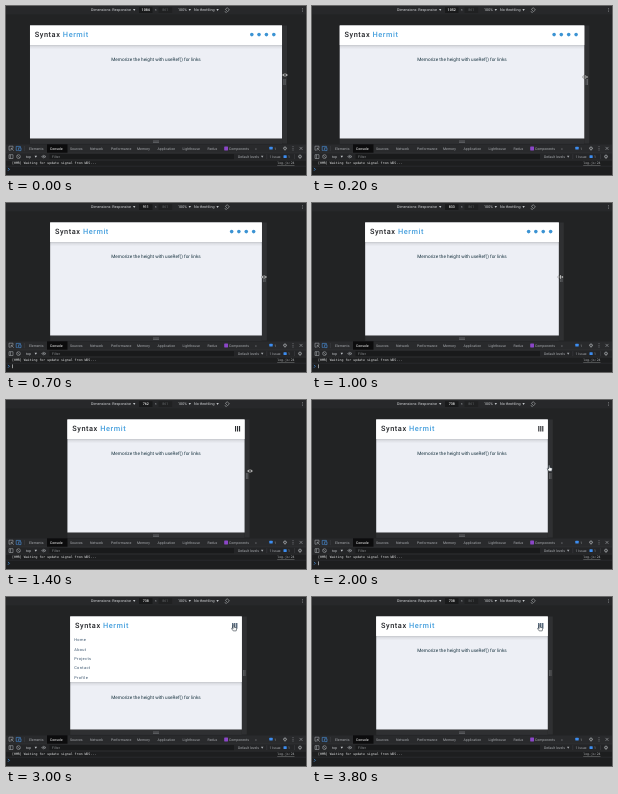
An HTML page that plays this animation: 300x169 px, repeating every 4.3 s.

```html
<!DOCTYPE html>
<html lang="en">
<head>
<meta charset="utf-8">
<title>Responsive menu</title>
<style>
  html, body { margin: 0; width: 100%; height: 100%; overflow: hidden; background: #222324; }
  svg { display: block; width: 100vw; height: 100vh; }
  text { font-family: Roboto, sans-serif; text-rendering: geometricPrecision; white-space: pre; }
  .mono { font-family: "DejaVu Sans Mono", monospace; }
</style>
</head>
<body>
<svg id="stage" viewBox="0 0 300 169" preserveAspectRatio="none">
  <defs>
    <linearGradient id="shade" x1="0" y1="0" x2="0" y2="1">
      <stop offset="0" stop-color="#000" stop-opacity=".17"/>
      <stop offset=".4" stop-color="#000" stop-opacity=".06"/>
      <stop offset="1" stop-color="#000" stop-opacity="0"/>
    </linearGradient>
    <clipPath id="menuClip"><rect id="menuBox" x="0" y="39" width="300" height="0"/></clipPath>
  </defs>
</svg>
<script>
const LOOP = 4300, STEP = 100, SCALE = 0.2325, MID = 150;
const NAV_BOTTOM = 39, MENU_HEIGHT = 46, PAGE_TOP = 19.5, PAGE_BOTTOM = 132.5;

// [ms, viewport width]
const WIDTHS = [[0, 1084], [200, 1052], [500, 966], [800, 883], [1000, 833],
  [1200, 804], [1400, 762], [1600, 762], [1800, 738]];
// [ms, x, y]
const POINTER = [[0, 279, 69], [500, 264.5, 74], [1000, 248.5, 74], [1400, 244, 71],
  [1600, 244, 71], [1800, 238.5, 72], [1950, 238.5, 72], [2500, 228, 31]];

const stage = document.getElementById('stage');
const menuBox = document.getElementById('menuBox');

function set(node, attrs) {
  for (const k in attrs) node.setAttribute(k, attrs[k]);
  return node;
}
function add(tag, attrs, parent = stage) {
  return parent.appendChild(set(document.createElementNS('http://www.w3.org/2000/svg', tag), attrs));
}
const rect = (x, y, width, height, fill, parent, more) =>
  add('rect', { x, y, width, height, fill, ...more }, parent);
const path = (d, stroke, parent, more) =>
  add('path', { d, stroke, fill: 'none', 'stroke-width': 0.55, ...more }, parent);
const disc = (cx, cy, r, fill, parent) => add('circle', { cx, cy, r, fill }, parent);
function label(str, x, y, size, fill, parent, more) {
  const node = add('text', { x, y, 'font-size': size, fill, ...more }, parent);
  node.textContent = str;
  return node;
}
const arrow = (x, y, fill = '#c4c7ca') =>
  path(`M${x} ${y}h2.4l-1.2 2z`, 'none', stage, { fill });
const dots = (x, y) => [-1.6, 0, 1.6].forEach(d => disc(x, y + d, 0.45, '#b4b7ba'));
function gear(x, y) {
  add('circle', { cx: x, cy: y, r: 1.5, fill: 'none', stroke: '#a9acaf', 'stroke-width': 0.9, 'stroke-dasharray': '.8 .38' });
  add('circle', { cx: x, cy: y, r: 1.1, fill: 'none', stroke: '#a9acaf', 'stroke-width': 0.5 });
}

function buildToolbar() {
  rect(0, 0, 300, 8.4, '#27282a');
  label('Dimensions: Responsive', 85, 5.3, 3.7, '#d5d7da');
  arrow(127, 3);
  rect(133, 1.2, 13.5, 5.8, '#191a1b');
  const width = label('', 139.7, 5.3, 3.6, '#f2f2f2', stage, { 'text-anchor': 'middle', 'font-weight': 500 });
  label('×', 148.7, 5.3, 3.6, '#a5a8ab');
  rect(152.6, 1.2, 13.5, 5.8, '#202122');
  label('861', 159.3, 5.3, 3.6, '#65686b', stage, { 'text-anchor': 'middle' });
  label('100%', 172, 5.3, 3.7, '#d5d7da');
  arrow(182.6, 3);
  label('No throttling', 188, 5.3, 3.7, '#d5d7da');
  arrow(210.4, 3);
  path('M219.4 3.2l2-1.5 2 2.3-2 1.6zM219 5.2q.2 1.4 1.7 1.4', '#b4b7ba');
  dots(296.5, 4);
  return width;
}

function buildDevtools() {
  const y = 143.8, soft = '#a9acb0';
  rect(0, 138.3, 300, 30.7, '#1d1e1f');
  rect(0, 138.3, 300, 8.7, '#292a2c');
  path('M3 140.2h4v1.7M3 140.2v4h1.6M5.2 142.3l2.6 2.4M5.2 142.3v2M5.2 142.3h2', soft);
  path('M10.2 140.4h4.2v1M10.2 140.4v4h1.6M12.6 141.8h2.4v2.8h-2.4z', '#4d9cf0');
  path('M18.4 140v5.2', '#494b4e', stage, { 'stroke-width': 0.4 });
  rect(41, 138.3, 20.5, 8.7, '#0c0c0d');
  [['Elements', 23], ['Console', 44], ['Sources', 64], ['Network', 84], ['Performance', 105],
    ['Memory', 131], ['Application', 151.5], ['Lighthouse', 176.5], ['Redux', 201.5], ['Components', 223]]
    .forEach(([name, x]) => label(name, x, y, 3.5, name === 'Console' ? '#fff' : soft));
  rect(218.2, 140.6, 3.8, 3.8, '#8b46c8', stage, { rx: 0.4 });
  label('»', 249, y, 3.6, soft);
  rect(263.3, 140.8, 3.4, 2.8, '#3d8df0', stage, { rx: 0.5 });
  label('1', 268.2, y, 3.3, soft);
  gear(279, 142.4);
  dots(287, 142.4);
  path('M293.5 140.9l3 3m0-3l-3 3', soft);

  const y2 = 151.9;
  rect(0, 147, 300, 7.2, '#242527');
  path('M0 147h300M0 154.2h300M0 160.2h300', '#3a3c3f', stage, { 'stroke-width': 0.4 });
  path('M3 148.7h4v3.8h-4zM4.4 148.7v3.8', soft);
  path('M11.1 149.3l2.7 2.7M10.6 150.6a1.9 1.9 0 1 0 3.8 0a1.9 1.9 0 1 0-3.8 0', soft);
  label('top', 20, y2, 3.5, '#c4c7ca');
  arrow(28.6, 149.8);
  path('M35.6 150.6q2.2-2.7 4.4 0q-2.2 2.7-4.4 0z', soft);
  disc(37.8, 150.6, 0.6, soft);
  rect(43.5, 148, 184.5, 5.2, '#191a1b');
  label('Filter', 46, y2, 3.5, '#85888b');
  label('Default levels', 232, y2, 3.5, soft);
  arrow(255, 149.8, soft);
  path('M260.8 148.2v4.8M288.5 148.2v4.8', '#494b4e', stage, { 'stroke-width': 0.4 });
  label('1 Issue:', 263.5, y2, 3.4, soft);
  rect(277.5, 149.2, 3.2, 2.7, '#3d8df0', stage, { rx: 0.5 });
  label('1', 282, y2, 3.4, soft);
  gear(294, 150.6);

  label('[HMR] Waiting for update signal from WDS...', 6, 158.3, 3.25, '#e4e5e6', stage, { class: 'mono' });
  label('log.js:24', 288.5, 158.3, 3.2, '#b0b2b4', stage,
    { class: 'mono', 'text-anchor': 'end', 'text-decoration': 'underline' });
  path('M2 161.9l1.4 1.4-1.4 1.4', '#4d9cf0', stage, { 'stroke-width': 0.7 });
  return rect(6.1, 161.4, 0.6, 3.8, '#e4e5e6');
}

function buildPage() {
  const strip = rect(0, PAGE_TOP, 5, 118.3 - 0.3, '#2f3032');
  const base = rect(0, PAGE_BOTTOM, 0, 5.4, '#2f3032');
  path('M147 135h6M147 136.4h6', '#8c8f92', stage, { 'stroke-width': 0.5 });
  const grip = add('g', {});
  path('M-.7 -3v6M.7 -3v6', '#8c8f92', grip, { 'stroke-width': 0.5 });

  const body = rect(0, PAGE_TOP, 0, PAGE_BOTTOM - PAGE_TOP, '#edeff5');
  const message = label('Memorize the height with useRef() for links', MID, 0, 4.7, '#17323f', stage, { 'text-anchor': 'middle' });
  const shade = rect(0, 0, 0, 4.5, 'url(#shade)');
  const nav = rect(0, PAGE_TOP, 0, 0, '#fff');

  const left = add('g', {});
  const title = label('', 4.8, 31, 7.4, '#222428', left, { 'font-weight': 500, 'letter-spacing': 0.55 });
  [['Syntax ', '#222428'], ['Hermit', '#459fdd']].forEach(([word, fill]) =>
    add('tspan', { fill }, title).textContent = word);
  const menu = add('g', { 'clip-path': 'url(#menuClip)' }, left);
  ['Home', 'About', 'Projects', 'Contact', 'Profile'].forEach((name, i) =>
    label(name, 4, 44.4 + i * 9.35, 3.9, '#324d67', menu, { 'letter-spacing': 0.38 }));

  const right = add('g', {});
  const social = add('g', {}, right);
  [-30.2, -23, -15.6, -8.2].forEach(x => disc(x, 28.6, 1.8, '#3b93d3', social));
  const bars = path('M-9 26v5.4M-7 26v5.4M-5 26v5.4', '#25272b', right, { 'stroke-width': 1.1 });
  return { strip, base, grip, body, message, shade, nav, left, right, social, bars };
}

function buildPointers() {
  const resize = add('g', {});
  path('M-.5 -2v4h1v-4zM-1.1 -1.5v3l-1.9 -1.5zM1.1 -1.5v3l1.9 -1.5z', '#111', resize,
    { fill: '#f4f4f4', 'stroke-width': 0.3 });
  const hand = add('g', {});
  path('M-.9 -2.8q.6 -.6 1.1 0v2l2 .5q.6 .2 .5 1l-.5 2.2h-3l-1.6 -2.2q0 -.8 .7 -.6l.8 .6z', '#15202b', hand,
    { fill: '#f7f7f7', 'stroke-width': 0.5 });
  return { resize, hand };
}

const page = buildPage();
const widthText = buildToolbar();
const caret = buildDevtools();
const { resize, hand } = buildPointers();

function sample(table, t) {
  const i = table.findIndex(row => row[0] > t);
  if (i < 0) return table[table.length - 1].slice(1);
  const a = table[i - 1], b = table[i], k = (t - a[0]) / (b[0] - a[0]);
  return a.slice(1).map((v, n) => v + (b[n + 1] - v) * k);
}
function ease(t, start, span) {
  const k = Math.min(1, Math.max(0, (t - start) / span));
  return k * k * (3 - 2 * k);
}
const show = (node, on) => set(node, { visibility: on ? 'visible' : 'hidden' });
const move = (node, x, y) => set(node, { transform: `translate(${x} ${y})` });

function render(t) {
  const [size] = sample(WIDTHS, t);
  const width = size * SCALE, x = MID - width / 2, end = MID + width / 2;
  const open = MENU_HEIGHT * (ease(t, 2620, 350) - ease(t, 3610, 180));
  const bottom = NAV_BOTTOM + open;

  widthText.textContent = Math.round(size);
  set(page.body, { x, width });
  set(page.nav, { x, width, height: bottom - PAGE_TOP });
  set(page.shade, { x, width, y: bottom });
  set(page.base, { x, width });
  set(page.strip, { x: end });
  set(page.message, { y: 54.6 + open * 1.03 });
  set(menuBox, { height: open });
  move(page.grip, end + 2.5, 76);
  move(page.left, x, 0);
  move(page.right, end, 0);
  show(page.social, size > 800);
  show(page.bars, size <= 800);

  const [px, py] = sample(POINTER, t), hover = t >= 2500;
  set(page.bars, { stroke: hover ? '#263c55' : '#25272b' });
  move(resize, px, py);
  move(hand, px, py);
  show(resize, t < 2000);
  show(hand, t >= 2000);
  show(caret, (t >= 600 && t < 1100) || (t >= 1700 && t < 2100));
}

function tick() {
  render(Math.floor(performance.now() % LOOP / STEP) * STEP);
  requestAnimationFrame(tick);
}
tick();
</script>
</body>
</html>
```
